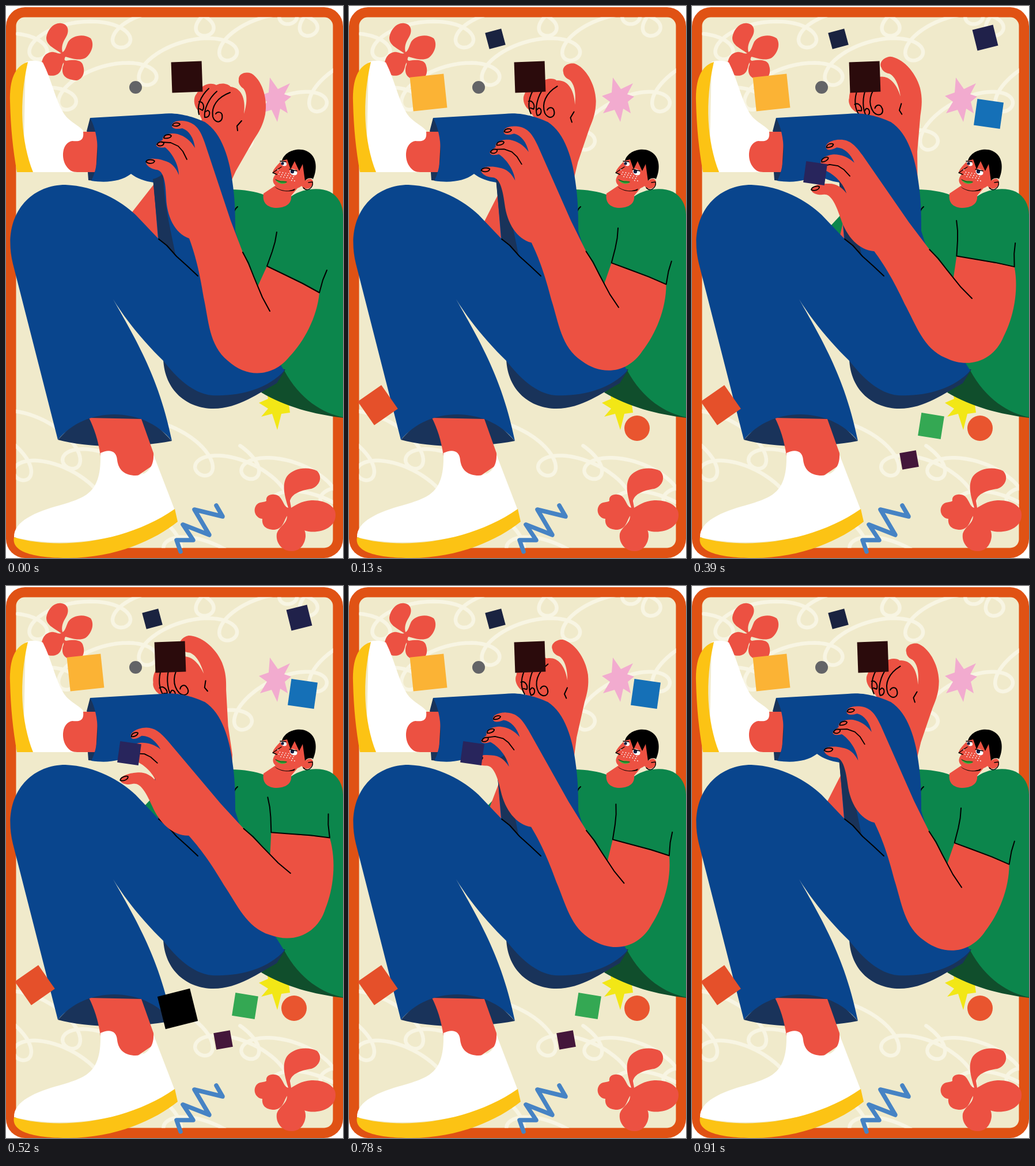
An HTML page with a canvas for the animation above (1040 ms loop, 585x957 px).

```html
<!DOCTYPE html>
<html lang="en">
<head>
<meta charset="utf-8">
<title>Reclining figure</title>
<style>
html, body { margin: 0; width: 100%; height: 100%; overflow: hidden; background: #fff; }
canvas { display: block; width: 585px; height: 957px; }
</style>
</head>
<body>
<canvas id="stage" width="585" height="957"></canvas>
<script>
const ctx = document.getElementById('stage').getContext('2d');
const STEP = 130, STEPS = 8;
const C = {
  frame: '#e05214', paper: '#f0eacb', swirl: '#f8f5e3', skin: '#ec5142',
  blue: '#09458d', navy: '#19335a', green: '#0c864c', moss: '#104e2c',
  gold: '#fcc314', pink: '#f2abcf', lemon: '#f2e716', sky: '#4683c4'
};

function fill(color, d) {
  ctx.fillStyle = color;
  ctx.fill(new Path2D(d));
}

function line(d, width = 2, color = '#000') {
  ctx.strokeStyle = color;
  ctx.lineWidth = width;
  ctx.stroke(new Path2D(d));
}

function dot(x, y, rx, ry = rx, color = '#fff', angle = 0) {
  ctx.fillStyle = color;
  ctx.beginPath();
  ctx.ellipse(x, y, rx, ry, angle, 0, Math.PI * 2);
  ctx.fill();
}

function rounded(x, y, w, h, r, color) {
  ctx.fillStyle = color;
  ctx.beginPath();
  ctx.roundRect(x, y, w, h, r);
  ctx.fill();
}

function turned(x, y, degrees, draw) {
  ctx.save();
  ctx.translate(x, y);
  ctx.rotate(degrees * Math.PI / 180);
  ctx.translate(-x, -y);
  draw();
  ctx.restore();
}

// A row of pen loops; (x, y) is the middle of one loop.
function loops(x, y, degrees, from, to, pitch = 146) {
  turned(x, y, degrees, () => {
    ctx.beginPath();
    for (let a = from * 2 * Math.PI; a < to * 2 * Math.PI; a += 0.08) {
      ctx.lineTo(x + pitch * a / (2 * Math.PI) - 46 * Math.sin(a), y - 10 + 27 * Math.cos(a));
    }
    ctx.strokeStyle = C.swirl;
    ctx.lineWidth = 6.5;
    ctx.stroke();
  });
}

function background() {
  rounded(0, 2, 585, 955, 33, C.frame);
  rounded(17.5, 19.5, 550, 920, 15, C.paper);
  ctx.save();
  ctx.beginPath();
  ctx.roundRect(17.5, 19.5, 550, 920, 15);
  ctx.clip();
  loops(200, 55, -8, -1.4, 3);
  loops(245, 120, -17, -1.4, 3);
  loops(410, 232, -27, -0.8, 2);
  loops(115, 785, 27, -1.4, 1.3);
  loops(345, 797, 25, -0.7, 2);
  loops(30, 805, 27, -0.5, 3);
  loops(425, 803, 20, -0.4, 1.5);
  ctx.restore();
}

function decorations() {
  fill(C.skin, `M96 82C82 72 70 68 70 55C72 40 84 28 96 30C110 32 110 46 103 56
    C98 64 96 72 98 80C103 78 104 70 108 62C116 50 136 48 147 56C154 66 149 82 138 90
    C126 96 112 90 103 88C101 92 101 94 104 95C116 93 132 92 134 104C138 116 132 128 122 129
    C110 128 97 124 98 110C98 104 101 102 100 98C96 104 98 112 90 118C80 124 66 120 62 110
    C60 94 66 82 78 80C86 79 90 84 96 82Z`);
  fill(C.skin, `M490 870C484 850 478 830 488 815C500 800 525 798 540 806
    C550 816 545 832 530 837C510 840 496 846 493 858L495 870C502 866 512 858 530 857
    C555 856 574 868 572 884C571 904 548 914 525 911C508 908 502 896 495 886
    C500 896 522 900 520 920C518 938 506 946 494 945C478 944 468 930 470 915
    C474 902 488 898 488 884C482 892 482 906 466 908C448 908 444 898 445 889
    C434 888 429 876 433 868C438 858 446 862 452 858C450 846 466 844 474 850
    C482 858 482 868 490 870Z`);
  fill(C.pink, `M458 124L472 144L493 134L483 153L495 157L484 166L489 186L476 178L471 201
    L461 180L441 186L453 166L439 156L456 150Z`);
  fill(C.lemon, 'M439 688L455 698L443 712L462 707L471 735L478 707L493 705L488 670L450 660L455 681Z');
  line('M303 946L296 926L325 926L307 899L353 917L327 873L376 885L365 866', 7.5, C.sky);
}

function backArm(degrees) {
  fill(C.green, 'M238 384L262 358L275 415Z');
  turned(319, 287, degrees, () => {
    fill(C.skin, `M404 128C403 118 415 113 426 117C443 127 455 158 450 188
      C446 207 440 217 430 232L399 286L378 332L330 400L265 440L205 375L256 310L340 197L333 181
      C325 172 325 158 331 152C340 135 355 132 365 137C375 132 386 135 390 140
      C407 142 417 158 413 187C420 165 418 150 412 143C406 139 403 133 404 128Z`);
    line(`M352 143C337 157 331 174 335 188M335 166C343 165 345 176 341 181L336 178
      M366 148C352 160 343 180 345 193C354 194 356 182 350 181L345 184
      M389 150C367 158 356 174 359 192C363 205 378 203 375 188C373 183 367 183 364 187
      M409 199L401 208L402 216`);
  });
}

function torso() {
  fill(C.moss, 'M478 628L443 670C485 695 535 708 585 714L585 690Z');
  fill(C.green, `M390 318C412 318 435 322 447 327L495 330C515 316 545 314 562 322
    C577 330 585 345 585 362L585 713C550 706 510 682 483 632L400 560Z`);
  line('M396 356L399 351L402 348', 2);
}

function head() {
  fill(C.skin, 'M468 311L447 325C444 343 456 350 470 350C490 349 496 340 495 329L510 311Z');
  fill('#000', 'M466 313C480 323 497 322 504 314L500 320C488 323 474 321 466 313Z');
  fill(C.skin, `M481 266C471 275 463 284 463 289L468 292C460 301 463 310 474 315
    C490 320 506 318 513 312C520 322 534 315 533 305C532 298 524 298 520 303L530 278L500 256Z`);
  fill('#000', `M479 268C484 251 507 245 521 251C540 259 541 282 533 300C528 297 522 299 519 303
    L515 274L509 286L501 269L494 283L488 266Z`);
  dot(482, 273, 5.5, 4, '#fff', 0.5);
  dot(499, 288, 7, 5, '#fff', 0.5);
  dot(480, 273, 2.6, 2.6, '#171c40');
  dot(497, 287, 3.2, 3.2, '#171c40');
  line('M476 269L486 270M492 283L505 286M478 279L463 289L470 292M516 315C523 323 534 315 532 305L525 306', 1.4);
  for (let i = 0; i < 18; i++) {
    dot(472 + i * 1.7, 284 + i * 0.6 + (i * 7 % 11), 0.9);
  }
  fill('#35b33b', 'M467 300C474 305 479 301 488 305C482 311 471 308 467 300Z');
  line('M468 301L477 305L487 305', 0.8);
}

function upperLeg() {
  fill('#fff', `M34 97C44 94 56 94 64 98C80 130 84 158 99 184C108 200 124 205 134 216
    L134 288L30 288Z`);
  fill(C.gold, 'M38 97C15 104 6 128 7 166C8 210 12 250 19 288L47 288C26 235 22 166 38 97Z');
  fill(C.navy, 'M146 194L140 217L158 240L152 288L142 288L143 302L152 303L175 250L160 194Z');
  fill(C.skin, `M160 218L134 218C136 235 126 235 115 234C97 237 95 264 105 278
    C110 285 115 288 124 288L156 288Z`);
  fill(C.blue, `M146 194L270 187C300 183 330 194 345 201C375 220 389 267 394 312
    C398 340 398 370 398 392L400 480L330 470L264 404L256 306C242 304 227 299 217 291
    C200 304 175 307 148 303C163 275 163 225 146 194Z`);
  fill(C.navy, 'M255 300C263 298 270 294 273 289C274 340 282 370 294 430L265 404Z');
}

function lowerLeg() {
  fill(C.navy, 'M273 612C275 667 315 698 360 698C404 698 440 670 470 654L485 630Z');
  fill(C.navy, 'M90 752C140 766 220 767 288 754L235 700L140 700Z');
  fill(C.skin, 'M144 714C153 732 160 752 164 780L192 812L226 816L257 795L256 775L235 716Z');
  fill('#fff', `M164 775C178 768 192 770 193 787C195 805 207 814 225 814
    C244 814 257 799 256 778L293 874C220 930 90 940 14 921C13 893 52 877 92 866
    C140 852 166 844 164 775Z`);
  fill(C.gold, `M14 921C90 944 210 930 293 872L298 894C260 925 190 957 108 957
    C60 957 8 950 14 921Z`);
  fill(C.blue, `M90 752L12 447C-8 365 40 310 103 310C155 312 200 338 225 362L265 404L333 468
    L398 390L466 605L483 632C455 664 405 677 358 675C324 672 296 644 273 615
    C230 573 190 523 163 467C210 555 262 625 288 754C240 694 140 692 90 752Z`);
  line('M265 404L279 415L296 434L316 452L333 468', 2);
}

function frontArm(degrees) {
  turned(395, 420, degrees, () => {
    fill(C.skin, `M288 208C288 198 305 198 313 200C331 204 338 217 345 237L390 372
      L411 427L437 486L453 451L544 497C540 540 517 582 492 608C465 642 420 647 385 615
      C352 588 352 545 343 505C336 460 328 430 318 403C293 394 279 365 278 332
      C277 300 272 286 262 284C252 283 242 276 243 270C245 263 262 264 274 268
      C287 271 295 280 300 293C300 275 288 254 276 245C265 247 258 243 262 238L272 232
      C271 223 284 219 298 222C311 226 320 233 328 246C326 229 318 216 306 212
      C296 214 289 213 288 208Z`);
    line(`M289 207C291 201 300 202 302 205C300 209 293 209 289 207
      M274 229C274 222 285 222 287 225C286 229 279 230 274 229
      M262 240C265 235 272 234 274 238C273 243 265 244 262 240
      M243 270C245 265 256 266 258 269C256 274 247 274 243 270
      M270 236L286 237L299 243L307 252L314 266`, 1.8);
    line('M411 427L421 446L430 469L445 505L458 529M470 392L467 409L462 426L453 451L480 464L515 481L544 497L550 475L557 458', 2);
  });
}

// Plain tiles: first pose they show in, centre, size, tilt, colour.
const TILES = [
  [1, 254, 57, 29, -15, '#1a2340'],
  [1, 138, 150, 59, -6, '#fbb335'],
  [1, 50, 692, 50, -35, '#e5502a'],
  [2, 515, 187, 46, 8, '#1570b7'],
  [2, 214, 290, 37, 8, '#28255c'],
  [2, 415, 728, 40, 9, '#34a853'],
  [2, 377, 787, 29, -10, '#44173a'],
  [3, 509, 55, 37, -14, '#20214a'],
  [4, 298, 733, 58, -14, '#000']
];

function tile(x, y, size, tilt, color) {
  turned(x, y, tilt, () => {
    ctx.fillStyle = color;
    ctx.fillRect(x - size / 2, y - size / 2, size, size);
  });
}

function tiles(pose) {
  dot(225, 141, 11, 11, '#636467');
  tile([314, 314, 314, 300, 285][pose], 123, 53, -2, '#2b0b0c');
  for (const [first, ...shape] of TILES) {
    if (pose >= first) tile(...shape);
  }
  if (pose >= 1) dot(500, 732, 22, 22, '#e9552f');
}

const BACK_ANGLES = [0, -11, -17.2, -25, -33];

function draw(pose) {
  ctx.clearRect(0, 0, 585, 957);
  ctx.lineJoin = ctx.lineCap = 'round';
  background();
  decorations();
  backArm(BACK_ANGLES[pose]);
  torso();
  head();
  upperLeg();
  lowerLeg();
  frontArm(-5.43 * pose);
  tiles(pose);
}

const start = performance.now();

function tick() {
  const step = Math.floor((performance.now() - start) / STEP) % STEPS;
  draw(Math.min(step, STEPS - step));
  requestAnimationFrame(tick);
}
tick();
</script>
</body>
</html>
```
